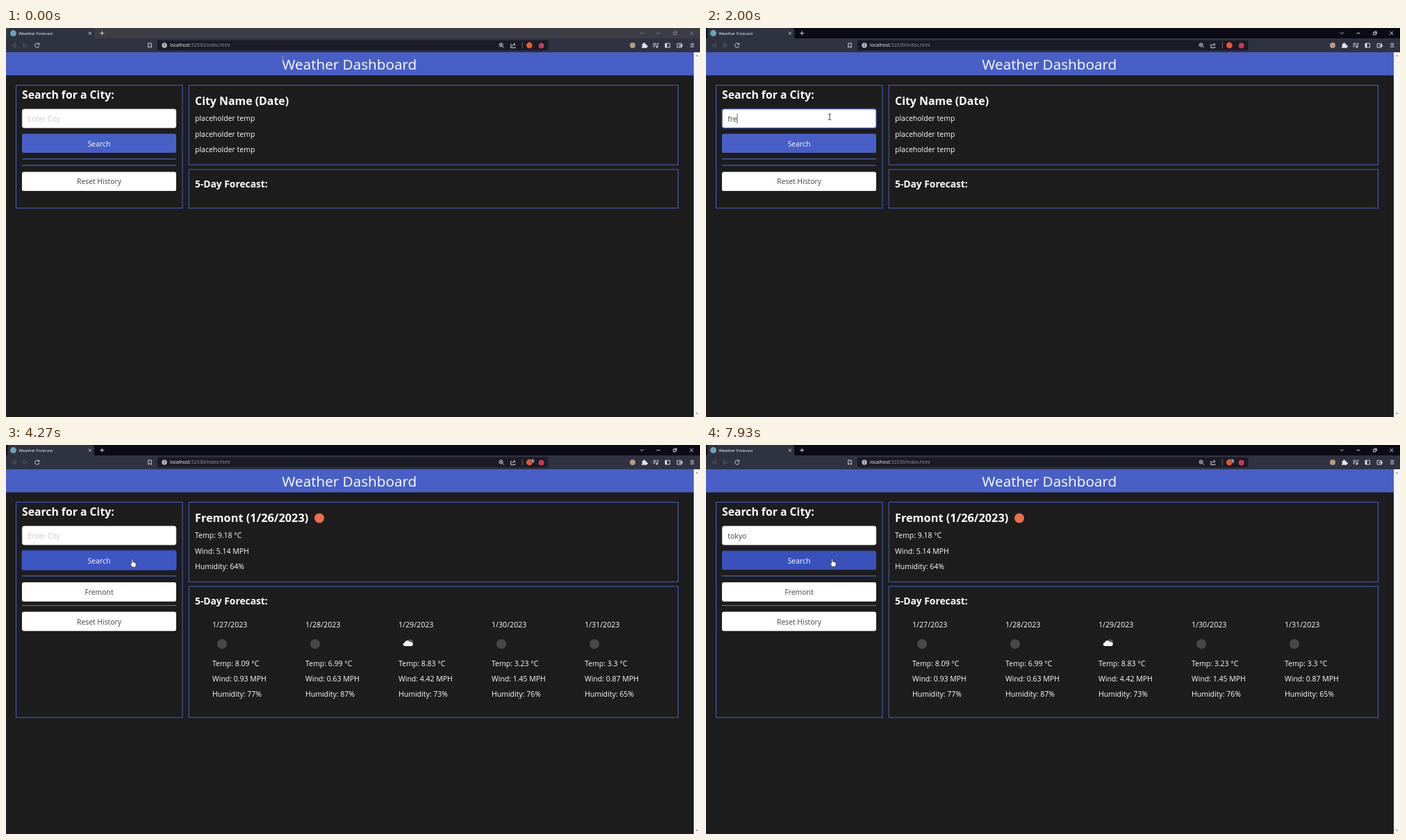
Recreate the animation shown at these times as an HTML page. Size 999 by 561 pixels, loop 8000 ms.

```html
<!DOCTYPE html>
<html lang="en">
<head>
<meta charset="utf-8">
<title>Weather Forecast</title>
<style>
  html, body { margin: 0; width: 100%; height: 100%; overflow: hidden; background: #1d1d1d; }
  svg { display: block; }
  text { font-family: "Open Sans", "Noto Sans", sans-serif; font-size: 10.5px; fill: #fff; white-space: pre; }
  .h { font-weight: 700; }
  .b { font-size: 10.4px; text-anchor: middle; }
  .dark { fill: #424242; }
  .panel { fill: none; stroke: #485fc7; }
  .icon { fill: none; stroke: #e6e6ea; stroke-width: .9; }
  .dim { stroke: #5d606e; }
  .solid { fill: #e6e6ea; stroke: none; }
</style>
</head>
<body>
<svg width="999" height="561" viewBox="0 0 999 561">
  <rect width="999" height="561" fill="#1d1d1d"/>

  <!-- browser frame -->
  <rect id="frame" width="999" height="16"/>
  <path d="M0 15Q2 15 2 12V3Q2 0 5 0H124Q127 0 127 3V12Q127 15 129 15H999V35H0Z" fill="#2f3240"/>
  <circle cx="10.5" cy="7.6" r="4.5" fill="#68a5b8"/>
  <text x="18.5" y="9.9" style="font-size:6px;font-weight:500">Weather Forecast</text>
  <path class="icon" d="M118.8 5.6l4 4m0-4l-4 4M135.2 7.5h6m-3-3v6"/>
  <path class="icon" id="controls" d="M912.8 6.2l2.4 2.4l2.4-2.4M936.5 7.5h5M960.6 6.2h3.6v3.6h-3.6zM961.8 5.1h3.5v3.5M984.4 5l5 5m0-5l-5 5"/>
  <path class="icon dim" d="M14 22l-5 3l5 3zM25.5 22l5 3l-5 3z"/>
  <path class="icon" d="M47.3 23.2a3.1 3.1 0 1 0 .5 2.6M47.8 21.6v2.2h-2.2"/>
  <path class="icon" d="M204.8 22h4.4v6.3l-2.2-1.7l-2.2 1.7z"/>
  <rect x="218" y="17.8" width="562.5" height="14.4" rx="2.2" fill="#1a1b24"/>
  <circle cx="228" cy="25" r="3.7" fill="#b9bac1"/>
  <path d="M228 22.6v2.8m0 .9v1" stroke="#1a1b24" stroke-width=".9"/>
  <text x="236" y="27.4" style="font-size:6.85px">localhost<tspan fill="#999ba5">:52330/index.html</tspan></text>
  <g class="icon">
    <circle cx="712.6" cy="24.4" r="2.6"/>
    <path d="M714.6 26.4l2.3 2.3M711.4 24.4h2.4m-1.2-1.2v2.4M728 23.6h-1.3v5h6v-1.8M728.5 26.5q.3-3 4-3m-1.5-1.9l2 1.9l-2 1.9"/>
    <path d="M743.3 20.5v9" stroke="#777985"/>
  </g>
  <circle cx="753.4" cy="25" r="4.4" fill="#f4552d"/>
  <circle cx="770.6" cy="25.4" r="4" fill="#c83a55"/>
  <g id="badge">
    <rect x="755" y="20.3" width="5.6" height="5.6" rx="1.2" fill="#62646e"/>
    <text id="count" x="757.8" y="24.8" style="font-size:4.6px;text-anchor:middle"></text>
  </g>
  <circle cx="902" cy="25" r="4" fill="#b69b83"/>
  <path class="solid" d="M915.3 23.2h2a1.4 1.4 0 1 1 2.6 0h2v2a1.4 1.4 0 1 1 0 2.5v1.3h-2.4a1.2 1.2 0 0 0-2.3 0h-1.9v-2a1.3 1.3 0 0 0 0-2.4z"/>
  <path class="icon" d="M931.4 22.4h5m-5 2.2h5m-5 2.2h3M938 27v-4.6h1.8"/>
  <circle class="solid" cx="937" cy="27.2" r="1.2"/>
  <path class="icon" d="M949 22.2h6.6v5.8h-6.6zM950.3 22.2v5.8M966.2 22.4h6.2v5.6h-6.2zM969.6 24.5h4v1.7h-4zM985.2 22.6h5.2m-5.2 2.3h5.2m-5.2 2.3h5.2"/>
  <path class="solid" d="M949 22.2h2.4v5.8h-2.4z"/>

  <!-- page -->
  <rect y="35" width="990" height="33.3" fill="#485fc7"/>
  <text x="397.3" y="60" style="font-size:20.7px">Weather Dashboard</text>
  <rect x="990" y="35" width="9" height="526" fill="#f6f6f6"/>
  <path d="M992.6 40.8l2-2l2 2zM992.6 555l2 2l2-2z" fill="#8a8a8a"/>

  <rect class="panel grow" x="14.5" y="82.5" width="239.5"/>
  <rect class="panel" x="263.2" y="82.5" width="704.3" height="114.8"/>
  <rect class="panel grow" x="263.2" y="204" width="704.3"/>

  <text class="h" x="23" y="102.4" style="font-size:15.75px">Search for a City:</text>
  <rect id="ring" x="22" width="224" rx="3.6" fill="#2b3873"/>
  <rect id="input" x="23.4" y="117" width="221.4" height="27" rx="2.7" fill="#fff"/>
  <text id="value" x="31.3" y="134.7" style="font-size:10.4px"></text>
  <rect id="caret" y="123.3" width=".8" height="14.4" fill="#363636"/>
  <rect id="search" x="23" y="152.4" width="222" height="27.7" rx="2.7"/>
  <text class="b" x="134" y="170.6">Search</text>
  <path d="M23 188.8H245" stroke="#4c62c4" stroke-width="1.3"/>

  <g id="before">
    <path d="M23 198.2H245" stroke="#485fc7" stroke-width="1.3"/>
    <text class="h" x="272" y="110.6" style="font-size:15.9px">City Name (Date)</text>
    <text x="272" y="134.2">placeholder temp</text>
    <text x="272" y="156.6">placeholder temp</text>
    <text x="272" y="178.9">placeholder temp</text>
  </g>
  <g id="reset">
    <rect x="23" y="207.4" width="222" height="27.7" rx="2.7" fill="#fff"/>
    <text class="b dark" x="134" y="225.4">Reset History</text>
  </g>
  <g id="after">
    <rect x="23" y="198" width="222" height="27.7" rx="2.7" fill="#fff"/>
    <text class="b dark" x="134" y="216">Fremont</text>
    <path d="M23 231.5H245" stroke="#7079a8"/>
    <text class="h" x="272" y="110.6" style="font-size:16.3px">Fremont (1/26/2023)</text>
    <circle cx="451" cy="105.5" r="7" fill="#ec6e4c"/>
    <text x="272" y="134.2">Temp: 9.18 °C</text>
    <text x="272" y="156.6">Wind: 5.14 MPH</text>
    <text x="272" y="178.9">Humidity: 64%</text>
    <g id="days"></g>
  </g>
  <text class="h" x="272" y="229.6" style="font-size:13.8px">5-Day Forecast:</text>

  <!-- pointers, hot spot at 0,0 -->
  <path id="beam" d="M-2-4.2q1.6 0 2 .6q.4-.6 2-.6M0-3.6v7.2M-2 4.2q1.6 0 2-.6q.4.6 2 .6" fill="none"/>
  <path id="arrow" d="M0 0v9.6l2.3-2l1.5 3.4l1.5-.7l-1.5-3.2h3z" fill="#fff" stroke="#111" stroke-width=".6"/>
  <path id="hand" d="M-1 .6q1-1.2 1.9 0v3.6q1.3-.5 1.7.4q1.2-.4 1.6.5q1.3-.2 1.3 1v2.7q0 2.9-2 2.9h-2.4q-1.2 0-2.2-1.7l-2.1-3.4q.4-1.2 2.2.3z" fill="#fff" stroke="#111" stroke-width=".7"/>
</svg>
<script>
const $ = id => document.getElementById(id);
const show = (id, on) => { $(id).style.display = on ? '' : 'none'; };
const fill = (id, color) => $(id).setAttribute('fill', color);

const days = [[8.09, 0.93, 77], [6.99, 0.63, 87], [8.83, 4.42, 73], [3.23, 1.45, 76], [3.3, 0.87, 65]];
const moon = '<circle cx="14" cy="287" r="7" fill="#48484a"/>';
const cloud = '<circle cx="17" cy="284.4" r="4.2" fill="#555558"/>' +
  '<path d="M8.6 290a2.6 2.6 0 0 1 .3-5.1a4.1 4.1 0 0 1 7.5-.7a3 3 0 0 1 2.3 5.8z" fill="#f5f5f5"/>';
$('days').innerHTML = days.map(([temp, wind, humidity], i) =>
  `<g transform="translate(${297 + 134 * i})">
    <text y="263" style="font-size:10.65px">1/${27 + i}/2023</text>${i === 2 ? cloud : moon}
    <text y="318.9">Temp: ${temp} °C</text>
    <text y="341.3">Wind: ${wind} MPH</text>
    <text y="363.2">Humidity: ${humidity}%</text>
  </g>`).join('');

const LOOP = 8000;
const entries = [
  { word: 'fremont', focus: 930, press: 3530, clear: 3730, keys: [1600, 1870, 2000, 2130, 2200, 2330, 2530] },
  { word: 'tokyo', focus: 5130, press: 7870, clear: LOOP, keys: [5870, 6070, 6130, 6400, 6670] },
];
// start, end, steps, destination
const moves = [
  [70, 800, 11, 178, 128.2],
  [3130, 3330, 4, 181.6, 164.6],
  [4730, 5070, 6, 180, 136.4],
  [7270, 7470, 4, 181.6, 164],
];
const badges = [[3730, 1], [4070, 2], [4270, 5], [7930, 6]];

function pointer(t) {
  let x = 398.5, y = 45;
  for (const [start, end, steps, tx, ty] of moves) {
    if (t < start) break;
    const step = Math.floor((t - start) / (end - start) * (steps - 1) + 1e-6) + 1;
    const k = Math.min(1, step / steps), e = k * k * (3 - 2 * k);
    x += (tx - x) * e;
    y += (ty - y) * e;
  }
  return [x, y];
}

function drawPointer(x, y) {
  const column = x > 23 && x < 245;
  const overInput = column && y > 117 && y < 144;
  const overSearch = column && y > 152 && y < 180;
  const overTitle = y < 68 && x > 397 && x < 592;
  const kind = overSearch ? 'hand' : overInput || overTitle ? 'beam' : 'arrow';
  for (const id of ['beam', 'arrow', 'hand']) show(id, id === kind);
  $(kind).setAttribute('transform', `translate(${x} ${y})`);
  $('beam').setAttribute('stroke', overInput ? '#333' : '#9a9aa2');
  return overSearch;
}

function draw(t) {
  const active = t >= 930, found = t >= 4270;
  fill('frame', active ? '#0b0b15' : '#3c3d45');
  $('controls').style.stroke = active ? '#e6e6ea' : '#85868d';

  const entry = entries[t < 5130 ? 0 : 1];
  const typed = entry.keys.filter(k => k <= t);
  const value = t < entry.clear ? entry.word.slice(0, typed.length) : '';
  const focused = t >= entry.focus && t < entry.press;
  const pressed = t >= entry.press && t < entry.clear;
  const ringed = t >= 3730 && t < 5130;

  $('value').textContent = value || 'Enter City';
  fill('value', '');
  $('value').style.fill = value ? '#424242' : '#cacaca';
  const last = typed.length ? typed[typed.length - 1] : entry.focus;
  show('caret', focused && (t - last) % 1000 < 530);
  $('caret').setAttribute('x', 31.2 + (value ? $('value').getComputedTextLength() : 0));
  $('input').setAttribute('stroke', focused ? '#485fc7' : '#e2e7df');
  $('input').setAttribute('stroke-width', .7);

  show('ring', focused || ringed);
  $('ring').setAttribute('y', focused ? 115.7 : 151.1);
  $('ring').setAttribute('height', focused ? 29.6 : 30.2);

  const hover = drawPointer(...pointer(t));
  fill('search', pressed ? '#3a51bb' : hover ? '#3e56c4' : '#485fc7');

  show('before', !found);
  show('after', found);
  $('reset').setAttribute('transform', `translate(0 ${found ? 33.2 : 0})`);
  document.querySelectorAll('.grow').forEach(p =>
    p.setAttribute('height', (found ? 393 : 259.8) - p.getAttribute('y')));

  const badge = badges.filter(b => b[0] <= t).pop();
  show('badge', badge);
  $('count').textContent = badge ? badge[1] : '';
}

function tick() {
  draw(performance.now() % LOOP);
  requestAnimationFrame(tick);
}
tick();
</script>
</body>
</html>
```
